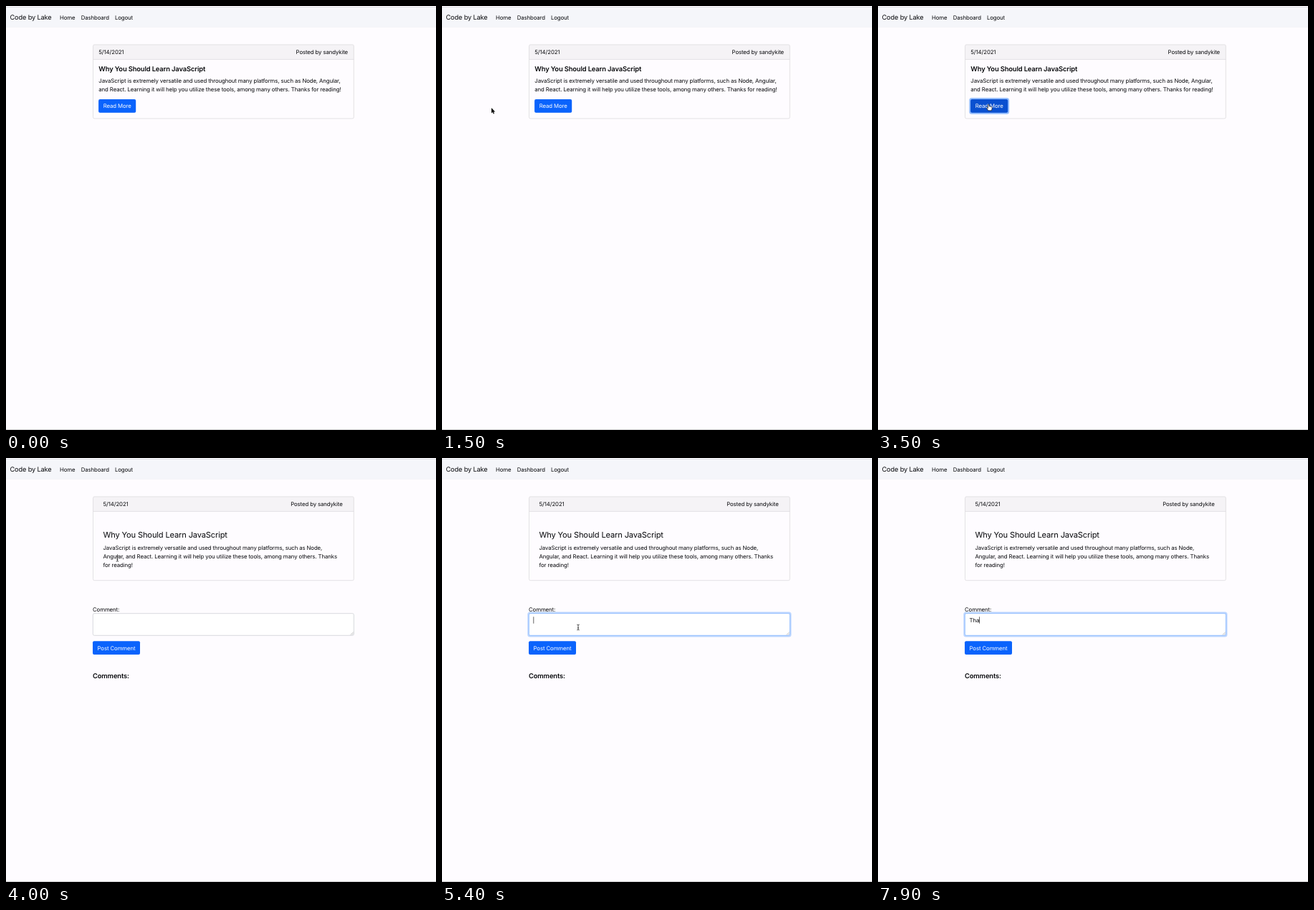
These frames come from a looping animation (600x591 px, 8 s). An HTML page with a canvas:

```html
<!DOCTYPE html>
<html lang="en">
<head>
<meta charset="utf-8">
<title>Blog post</title>
<style>
  html, body { margin: 0; width: 100%; height: 100%; overflow: hidden; background: #fefcff; }
  canvas { display: block; width: 600px; height: 591px; }
</style>
</head>
<body>
<canvas id="stage"></canvas>
<script>
const W = 600, H = 591, LOOP = 8000, STEP = 100;
const canvas = document.getElementById('stage');
const ctx = canvas.getContext('2d');
const dpr = window.devicePixelRatio || 1;
canvas.width = W * dpr;
canvas.height = H * dpr;

const INK = '#08090c', PAGE = '#fefcff', EDGE = '#dcdbde', BLUE = '#0a63fc';
const BODY = 7.8, HEAD = 9.35, TRACK = -0.0135;
const TITLE = 'Why You Should Learn JavaScript';
const AUTHOR = 'Posted by sandykite';
const DATE = '5/14/2021';

// Pointer path: time, x, y, shape
const path = [
  [400, 268, 176, 'arrow'],
  [800, 196, 234, 'arrow'],
  [1200, 113, 199, 'arrow'],
  [1500, 69, 142, 'arrow'],
  [1700, 80, 79, 'arrow'],
  [1800, 80, 79, 'arrow'],
  [2000, 110, 98, 'arrow'],
  [2200, 110, 98, 'arrow'],
  [2400, 148, 130, 'hand'],
  [2500, 154.3, 132.3, 'hand'],
  [3000, 154.3, 137.2, 'hand'],
  [3600, 154.3, 137.2, 'beam'],
  [4200, 156, 142, 'beam'],
  [4400, 163, 163, 'arrow'],
  [4700, 183, 217, 'beam'],
  [5000, 190, 234, 'beam'],
  [5100, 190, 236, 'beam'],
  [6200, 190, 236, 'beam'],
  [6400, 189, 234, 'beam'],
  [7600, 189, 234, 'none']
];

function pointer(t) {
  if (t < path[0][0]) return null;
  let i = 0;
  while (i < path.length - 1 && path[i + 1][0] <= t) i++;
  const a = path[i], b = path[i + 1] || a;
  const k = b === a ? 0 : (t - a[0]) / (b[0] - a[0]);
  return { x: a[1] + (b[1] - a[1]) * k, y: a[2] + (b[2] - a[2]) * k, shape: a[3] };
}

// y is the middle of the capitals
function text(str, x, y, size = BODY, { weight = 400, color = INK, align = 'left' } = {}) {
  ctx.font = `${weight} ${size}px Inter, "Open Sans", sans-serif`;
  ctx.letterSpacing = `${size * TRACK}px`;
  ctx.textRendering = 'geometricPrecision';
  ctx.textAlign = align;
  ctx.fillStyle = color;
  ctx.fillText(str, x, y + size * 0.35);
  return ctx.measureText(str).width;
}

function box(x, y, w, h, r, fill, stroke, line = 0.8) {
  ctx.beginPath();
  ctx.roundRect(x, y, w, h, r);
  if (fill) {
    ctx.fillStyle = fill;
    ctx.fill();
  }
  if (stroke) {
    ctx.strokeStyle = stroke;
    ctx.lineWidth = line;
    ctx.stroke();
  }
}

function bar(y, h, color) {
  ctx.fillStyle = color;
  ctx.fillRect(0, y, W, h);
}

function button(label, x, y, w, fill, ring) {
  const h = 18.8;
  if (ring) box(x - 1.9, y - 1.9, w + 3.8, h + 3.8, 3.5, `rgba(49,132,253,${0.5 * ring})`);
  box(x, y, w, h, 2, fill);
  text(label, x + w / 2, y + h / 2 + 0.1, BODY, { color: '#fff', align: 'center' });
}

function frame() {
  ctx.fillStyle = PAGE;
  ctx.fillRect(0, 0, W, H);
  bar(1, 1, '#dcdee3');
  bar(2, 27, '#f5f6fa');
  bar(29, 0.6, '#eff0f4');
  bar(590, 1, '#cbcacc');
  text('Code by Lake', 5.5, 16, 9.2);
  text('Home', 75, 16);
  text('Dashboard', 104.7, 16);
  text('Logout', 152, 16);
}

function card(height, left, right) {
  box(121.5, 53.9, 363.8, height, 2, PAGE);
  box(121.5, 53.9, 363.8, 20.4, [2, 2, 0, 0], '#f5f3f6');
  ctx.fillStyle = EDGE;
  ctx.fillRect(121.5, 73.9, 363.8, 0.8);
  box(121.5, 53.9, 363.8, height, 2, null, EDGE);
  text(DATE, left, 64);
  text(AUTHOR, right, 64, BODY, { align: 'right' });
}

function listView(t) {
  card(103, 129.3, 477);
  text(TITLE, 129.3, 88.2, HEAD, { weight: 600 });
  text('JavaScript is extremely versatile and used throughout many platforms, such as Node, Angular,', 129.3, 104);
  text('and React. Learning it will help you utilize these tools, among many others. Thanks for reading!', 129.3, 116);
  const fill = t >= 3200 ? '#0a50d0' : t >= 2400 ? '#085af0' : BLUE;
  const ring = t >= 3400 ? 1 : t >= 3300 ? 0.7 : t >= 3200 ? 0.3 : 0;
  button('Read More', 129.1, 130, 52.1, fill, ring);
}

function commentBox(t) {
  const focus = t >= 5400 ? 1 : t >= 5300 ? 0.5 : 0;
  if (focus) box(119.3, 214.6, 368.2, 34.8, 3.5, `rgba(13,110,253,${0.27 * focus})`);
  box(121.3, 216.7, 364.1, 30.6, 2, '#fff', focus ? '#86b7fe' : '#ced1d6');
  ctx.strokeStyle = '#8d8d8f';
  ctx.lineWidth = 0.5;
  ctx.beginPath();
  for (const d of [2, 4]) {
    ctx.moveTo(484.7 - d, 246.6);
    ctx.lineTo(484.7, 246.6 - d);
  }
  ctx.stroke();

  const typed = 'Tha'.slice(0, t >= 7900 ? 3 : t >= 7800 ? 2 : t >= 7600 ? 1 : 0);
  const end = 127.5 + (typed ? text(typed, 127.5, 226) : 0);
  const blinkOn = t >= 7300 || Math.floor((t - 5300) / 500) % 2 === 0;
  if (focus && blinkOn) {
    ctx.fillStyle = '#222';
    ctx.fillRect(end, 221.3, 0.7, 9.4);
  }
}

function postView(t) {
  card(116.8, 135.5, 469.6);
  text(TITLE, 135.5, 107, 11.1);
  text('JavaScript is extremely versatile and used throughout many platforms, such as Node,', 135.5, 125);
  text('Angular, and React. Learning it will help you utilize these tools, among many others. Thanks', 135.5, 137);
  text('for reading!', 135.5, 149);
  text('Comment:', 121, 211);
  commentBox(t);
  button('Post Comment', 121, 255.3, 66, BLUE, 0);
  text('Comments:', 121, 304, HEAD, { weight: 600 });
}

const shapes = {
  arrow() {
    const p = new Path2D('M0 0V7.4L1.7 5.8L2.8 8.4L4 7.9L2.9 5.4H5.2Z');
    ctx.strokeStyle = '#fff';
    ctx.lineWidth = 1.2;
    ctx.stroke(p);
    ctx.fillStyle = '#000';
    ctx.fill(p);
  },
  hand() {
    const p = new Path2D('M-.9 .3Q0 -.6 .8 .3V2.8Q1.6 2.3 2.2 3Q3 2.6 3.6 3.4Q4.6 3.2 4.8 4.2V6.2L4 8.6H-.4L-2.7 5.3Q-2.6 4.1 -1.5 4.7L-.9 5.3Z');
    ctx.fillStyle = '#fff';
    ctx.fill(p);
    ctx.strokeStyle = '#111';
    ctx.lineWidth = 0.7;
    ctx.stroke(p);
  },
  beam() {
    const p = new Path2D('M-1.7 -3.8Q0 -3.8 0 -2.8Q0 -3.8 1.7 -3.8M0 -2.8V2.8M-1.7 3.8Q0 3.8 0 2.8Q0 3.8 1.7 3.8M-1 .9H1');
    ctx.strokeStyle = '#222';
    ctx.lineWidth = 0.8;
    ctx.stroke(p);
  },
  none() {}
};

function draw(t) {
  ctx.setTransform(dpr, 0, 0, dpr, 0, 0);
  frame();
  if (t < 3600) listView(t);
  else postView(t);
  const p = pointer(t);
  if (!p) return;
  ctx.save();
  ctx.translate(p.x, p.y);
  ctx.lineJoin = 'round';
  shapes[p.shape]();
  ctx.restore();
}

const start = performance.now();
function tick() {
  const t = (performance.now() - start) % LOOP;
  draw(Math.floor(t / STEP) * STEP);
  requestAnimationFrame(tick);
}
tick();
</script>
</body>
</html>
```
